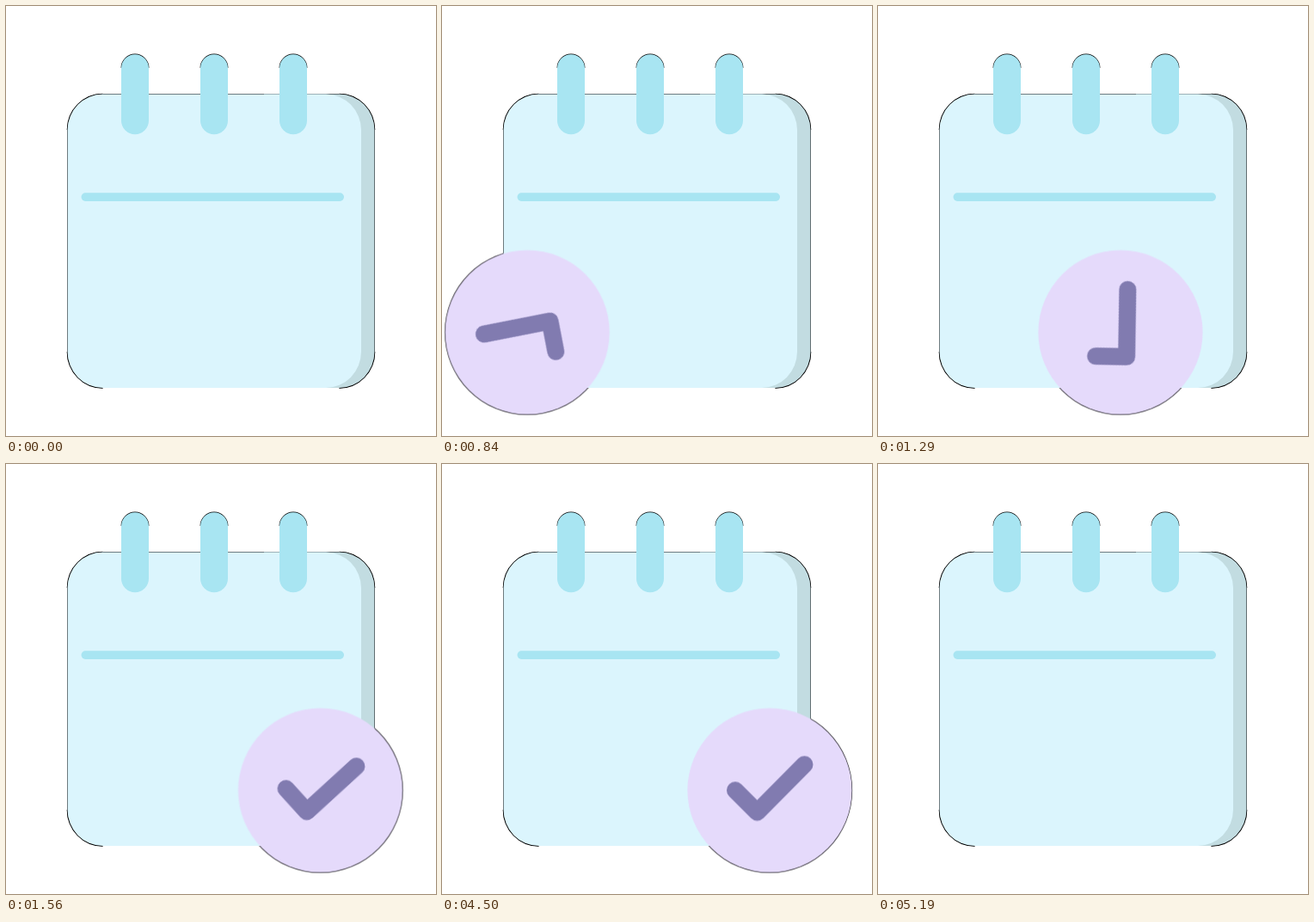
Write an HTML page without scripts that moves like this. It is 500 px wide and 500 px high and loops after 5460 ms.

```html
<!DOCTYPE html>
<html lang="en">
<head>
<meta charset="utf-8">
<title>Calendar check</title>
<style>
  html, body { margin: 0; width: 100%; height: 100%; overflow: hidden; background: #fff; }
  svg { display: block; width: 100vw; height: 100vh; }

  .edge { fill: none; stroke: #000; }
  .tint { fill: #a8e5f2; }
  .check {
    fill: none; stroke: #817bb0; stroke-width: 20;
    stroke-linecap: round; stroke-linejoin: round;
  }

  /* The clock runs 32 ms ahead, so the badge is already rolling at load */
  .roll, .spin, .check { animation: roll 5460ms -32ms infinite; }
  .spin { animation-name: spin; }
  .check { animation-name: ink; animation-timing-function: step-end; }

  /* Roll in, overshoot, settle, hold, roll out */
  @keyframes roll {
    0%      { transform: translate(-116px, 379.4px); animation-timing-function: cubic-bezier(.364, 0, .636, 1); }
    36.429% { transform: translate(416px, 379.4px); animation-timing-function: cubic-bezier(.33, 0, .67, .55); }
    40.147% { transform: translate(392.6px, 379.4px); animation-timing-function: step-end; }
    83.003% { transform: translate(381px, 379.4px); animation-timing-function: cubic-bezier(.364, 0, .636, 1); }
    100%    { transform: translate(640px, 379.4px); }
  }
  @keyframes spin {
    0%      { transform: rotate(-266deg); animation-timing-function: cubic-bezier(.364, 0, .636, 1); }
    36.429% { transform: rotate(31deg); animation-timing-function: cubic-bezier(.33, 0, .67, .8); }
    40.147% { transform: rotate(0deg); animation-timing-function: step-end; }
    83.003% { transform: rotate(0deg); animation-timing-function: cubic-bezier(.364, 0, .636, 1); }
    100%    { transform: rotate(144deg); }
  }
  @keyframes ink {
    0%  { stroke: #7f9094; }
    13% { stroke: #817bb0; }
  }
</style>
</head>
<body>
<svg viewBox="0 0 500 500">
  <defs>
    <g id="ring">
      <path class="edge" stroke-width="1.4" d="M-15.7 72A15.7 15.7 0 0 1 15.7 72"/>
      <rect class="tint" x="-16" y="56.3" width="32" height="93" rx="16"/>
    </g>
  </defs>

  <!-- dark rims, seen only against white -->
  <circle class="roll" r="96.1"/>
  <path class="edge" d="M112.5 444A41 42 0 0 1 71.5 402V144A41 42 0 0 1 112.5 102.5H387.5A41 42 0 0 1 428.5 144V402A41 42 0 0 1 387.5 444"/>
  <path class="edge" stroke-width="1.6" d="M112.5 444A41 42 0 0 1 71.5 402M71.5 144A41 42 0 0 1 112.5 102.5M387.5 102.5A41 42 0 0 1 428.5 144M428.5 402A41 42 0 0 1 387.5 444"/>

  <!-- calendar -->
  <path fill="#c2dce1" d="M300 102.5H387.5A41 42 0 0 1 428.5 144V402A41 42 0 0 1 387.5 444H300Z"/>
  <path fill="#dbf5fd" d="M112.5 102.5H372A41 42 0 0 1 413 144V402A41 42 0 0 1 372 444H112.5A41 42 0 0 1 71.5 402V144A41 42 0 0 1 112.5 102.5Z"/>
  <use href="#ring" x="150"/>
  <use href="#ring" x="242"/>
  <use href="#ring" x="334"/>
  <rect class="tint" x="87.5" y="217.3" width="305.5" height="9.6" rx="4.8"/>

  <!-- badge -->
  <g class="roll">
    <circle r="95.6" fill="#e5dafb"/>
    <g class="spin"><path class="check" d="M-40 0L-14.5 25.5L40.5 -30"/></g>
  </g>
</svg>
</body>
</html>
```
